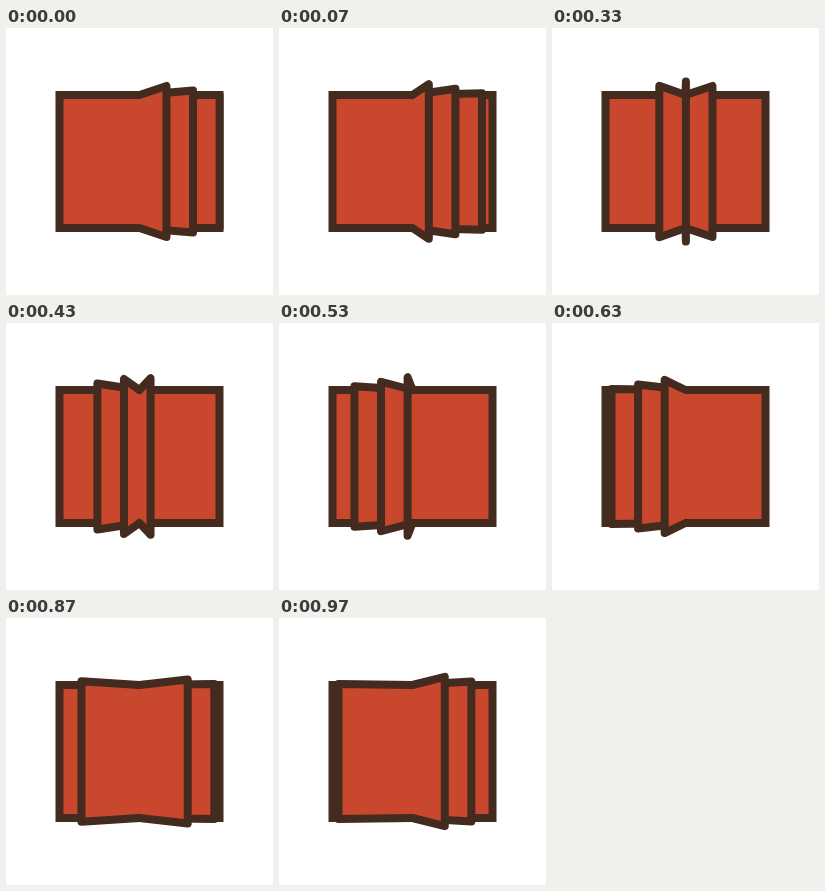
These frames come from a looping animation (267x267 px, 1 s). An HTML page:

```html
<!DOCTYPE html>
<html lang="en">
<head>
<meta charset="utf-8">
<title>Turning pages</title>
<style>
  html, body { margin: 0; width: 100%; height: 100%; overflow: hidden; background: #fff; }
  svg { display: block; width: 100%; height: 100%; }
  rect, path { fill: #c9472d; stroke: #432b1f; stroke-width: 8; }
  path { stroke-linejoin: round; stroke-linecap: round; }
</style>
</head>
<body>
<svg viewBox="0 0 267 267">
  <rect x="53.5" y="67" width="160" height="133"/>
  <path/><path/><path/>
</svg>
<script>
  const LOOP = 1000, FPS = 30;
  const SPINE = 133.5, TOP = 67, BOTTOM = 200, HALF = 80;
  const START = 80.1, TRAVEL = 159.4, LIFT = 13.6;
  const PHASES = [0, 1 / 6, 1 / 3];
  const paths = document.querySelectorAll('path');

  // Sheet from the spine to its free edge, which rises as it nears the spine
  function sheet(offset) {
    const x = SPINE + offset;
    const lift = LIFT * Math.max(0, 1 - Math.abs(offset) / HALF);
    return `M${SPINE} ${TOP}L${x} ${TOP - lift}V${BOTTOM + lift}L${SPINE} ${BOTTOM}`;
  }

  function draw(ms) {
    const tick = Math.floor((ms % LOOP) / 10) * 10 + 4;
    const t = Math.floor(tick * FPS / 1000) / FPS;
    // Sheets nearest the spine lie on top
    PHASES
      .map(phase => START - TRAVEL * ((t + phase + 1e-9) % 1))
      .sort((a, b) => Math.abs(b) - Math.abs(a))
      .forEach((offset, i) => paths[i].setAttribute('d', sheet(offset)));
  }

  const begin = performance.now();
  function loop() {
    draw(performance.now() - begin);
    requestAnimationFrame(loop);
  }
  loop();
</script>
</body>
</html>
```
